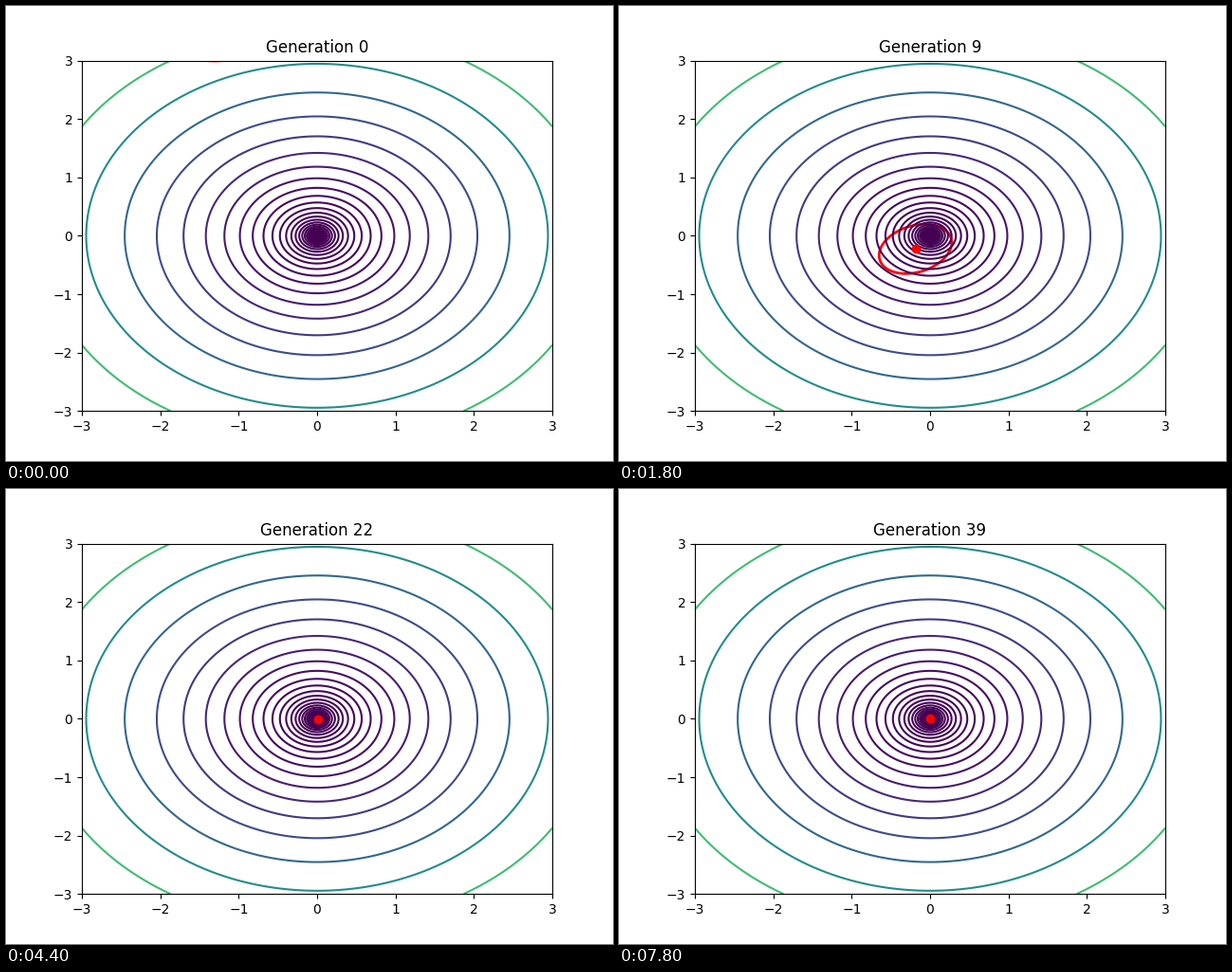
These frames come from a looping animation (640 by 480 pixels, 8 s). A matplotlib script:

```python
import numpy as np
import matplotlib.pyplot as plt
from matplotlib.animation import FuncAnimation

FRAMES = 40
INTERVAL = 200
LIM = 3

# Turning points of the search path
STOPS = [0, 4, 9, 14, 39]
PATH_X = [-1.306, 1.293, -0.187, 0.014, 0]
PATH_Y = [4.08, -0.203, -0.225, -0.016, 0]


def spread(gen):
    """Half width, half height and correlation of the search ellipse.

    It shrinks exponentially while its stretch first grows, then fades,
    and turns at a steady rate.
    """
    scale = 1.085 * np.exp(-0.0993 * gen)
    stretch = 0.294 * gen * np.exp(-0.2515 * gen)
    turn = np.radians(24.5 * (gen - 4) - 51.7)
    p, q = stretch * np.cos(turn), stretch * np.sin(turn)
    return scale * np.sqrt(1 + p), scale * np.sqrt(1 - p), q / np.sqrt(1 - p * p)


fig, ax = plt.subplots(figsize=(6.4, 4.8), dpi=100)

grid = np.linspace(-LIM, LIM, 200)
X, Y = np.meshgrid(grid, grid)
Z = X**2 + Y**2
levels = np.logspace(np.log10(Z.min()), np.log10(Z.max()), 30)
ax.contour(X, Y, Z, levels=levels, cmap="viridis", linewidths=1.5)

ax.set_xlim(-LIM, LIM)
ax.set_ylim(-LIM, LIM)
title = ax.set_title("Generation 0")
ellipse, = ax.plot([], [], color="red", lw=2, zorder=1)
dot, = ax.plot([], [], "ro", zorder=2.2)

angle = np.linspace(0, 2 * np.pi, 200)


def update(gen):
    mx, my = np.interp(gen, STOPS, PATH_X), np.interp(gen, STOPS, PATH_Y)
    sx, sy, rho = spread(gen)
    ellipse.set_data(mx + sx * np.cos(angle),
                     my + sy * np.cos(angle - np.arccos(rho)))
    dot.set_data([mx], [my])
    title.set_text(f"Generation {gen}")
    return ellipse, dot, title


anim = FuncAnimation(fig, update, frames=FRAMES, interval=INTERVAL,
                     repeat=True, repeat_delay=0, blit=False)
plt.show()
```
